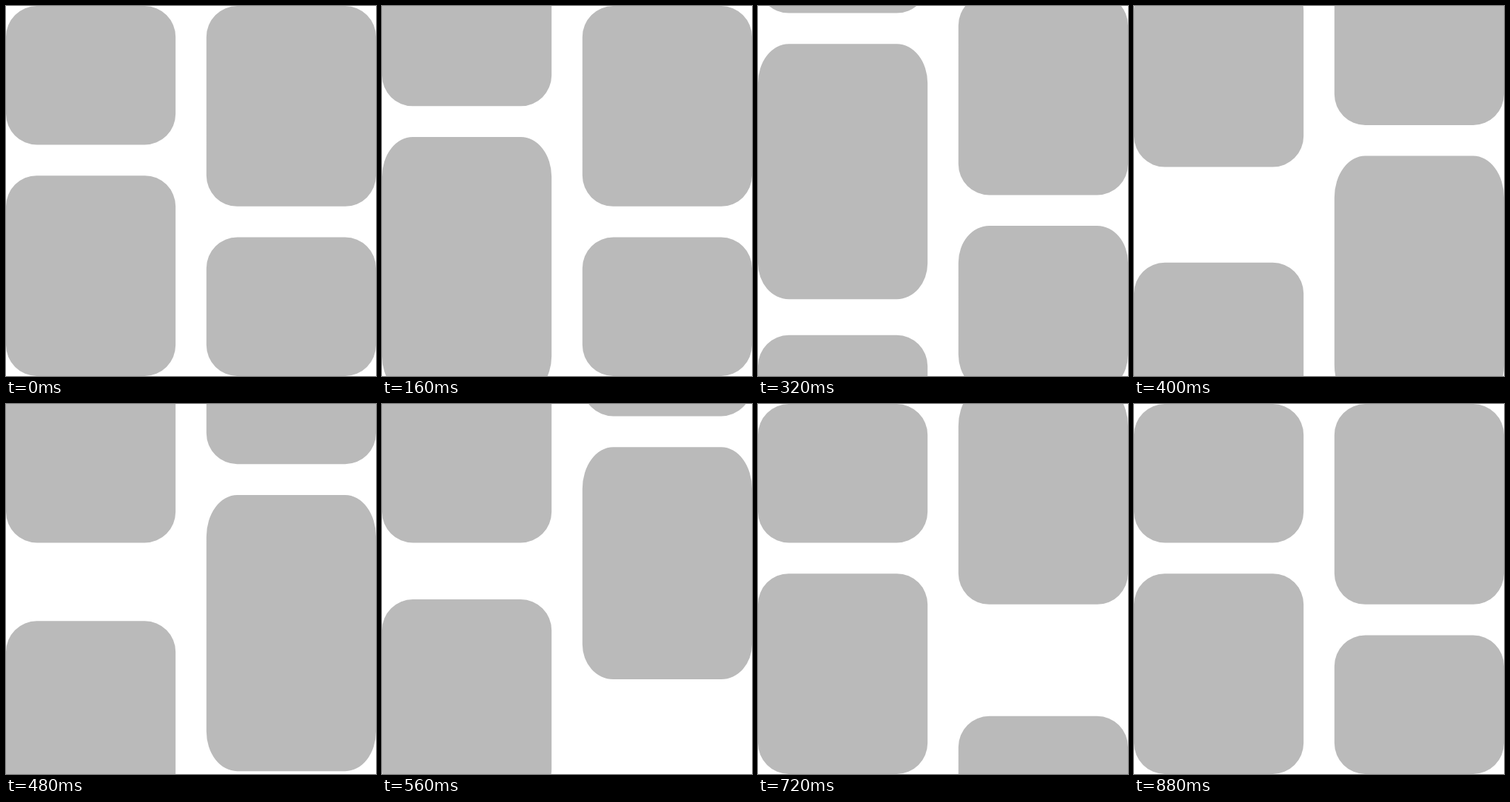
Recreate the animation shown at these times as an HTML page. Size 500x500 px, loop 1040 ms.

```html
<!DOCTYPE html>
<html lang="en">
<head>
<meta charset="utf-8">
<title>Tile shuffle</title>
<style>
  html, body { margin: 0; width: 100%; height: 100%; overflow: hidden; background: #fff; }
  svg { display: block; width: 100vw; height: 100vh; }
</style>
</head>
<body>
<svg viewBox="0 0 500 500" fill="#bababa"><path id="tiles"/></svg>
<script>
const STEP = 80, LOOP = 1040;
const SIZE = 500, U = SIZE / 24;     // layout grid
const WIDTH = 11 * U, GAP = 2 * U, R = 2 * U;
const TRAVEL = 17.5 * U;             // how far a column is pushed up
const SWELL = 2 * U;                 // how far the lower tile stretches down
const DECAY = 0.545;                 // remaining distance per step of the rising tile
const MAX_STRETCH = 1.35;

const clamp = (v, lo, hi) => Math.min(hi, Math.max(lo, v));
const mix = (a, b, p) => a + (b - a) * p;
const phase = (s, start, length) => clamp((s - start) / length, 0, 1);
const sine = p => (1 - Math.cos(Math.PI * p)) / 2;
const easeIn = p => p ** 1.77;
const easeOut = p => p * (2 - p);

// Times are [start, length] in steps.
const columns = [
  { x: 0, upper: 9 * U, ease: easeIn,
    push: [0, 6], swell: [0, 3.35], fall: [2.8, 2.71], arrive: 3.9, settle: 8 },
  { x: 13 * U, upper: 13 * U, ease: easeOut,
    push: [3.85, 7], swell: [3, 2], fall: [5.14, 3.2], arrive: 7.78, settle: 11 }
];

// Tile with separate vertical radii for its upper and lower corners.
function tile(x, top, bottom, rt = R, rb = rt) {
  const w = WIDTH - 2 * R;
  return `M${x + R} ${top}h${w}a${R} ${rt} 0 0 1 ${R} ${rt}V${bottom - rb}` +
    `a${R} ${rb} 0 0 1 ${-R} ${rb}h${-w}a${R} ${rb} 0 0 1 ${-R} ${-rb}` +
    `V${top + rt}a${R} ${rt} 0 0 1 ${R} ${-rt}z`;
}

// The upper tile leaves, the stretched lower one takes its place, a new one rises.
function column(c, s) {
  const { x, upper } = c, lower = upper + GAP;
  if (s >= c.settle) return tile(x, 0, upper) + tile(x, lower, SIZE);

  const shift = TRAVEL * c.ease(phase(s, ...c.push));
  const swell = SWELL * sine(phase(s, ...c.swell));
  const fall = sine(phase(s, ...c.fall));

  const top = lower - shift;
  const bottom = mix(SIZE + swell, upper, fall);
  const stretch = clamp((bottom - top) / (SIZE - lower), 1, MAX_STRETCH);
  const rise = lower + WIDTH * DECAY ** (s - c.arrive);

  return tile(x, -shift, upper - shift) +
    tile(x, top, bottom, R * stretch, mix(R * stretch, R, fall)) +
    tile(x, rise, rise + SIZE - lower);
}

const path = document.getElementById('tiles');
const start = performance.now();

function tick() {
  const s = Math.floor((performance.now() - start) % LOOP / STEP);
  path.setAttribute('d', columns.map(c => column(c, s)).join(''));
  requestAnimationFrame(tick);
}
tick();
</script>
</body>
</html>
```
